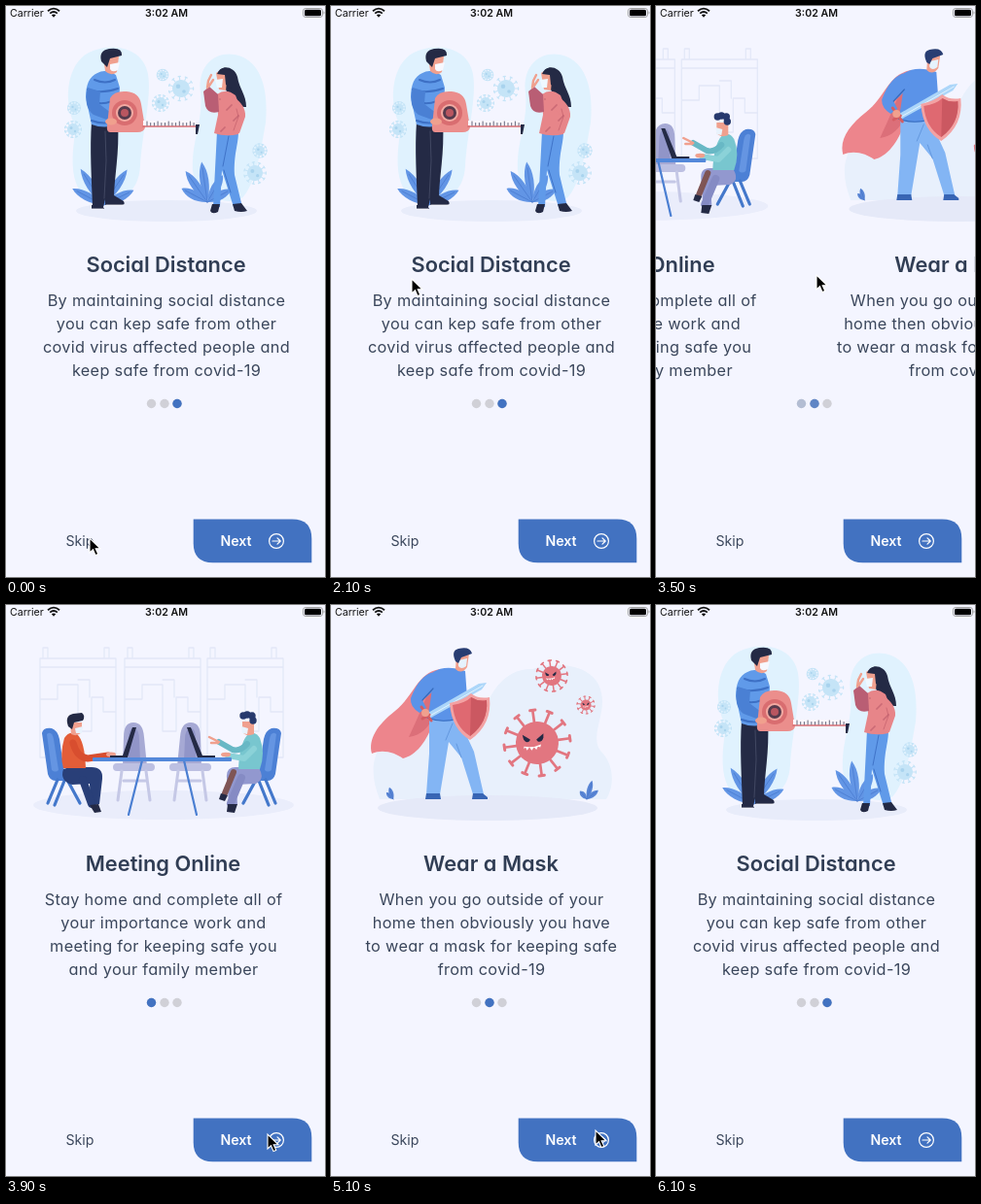
Recreate the animation shown at these times as an HTML page. Size 328 by 588 pixels, loop 6900 ms.

```html
<!DOCTYPE html>
<html lang="en">
<head>
<meta charset="utf-8">
<title>Onboarding</title>
<style>
html, body { margin: 0; width: 100%; height: 100%; overflow: hidden; background: #f4f5ff; }
svg { display: block; width: 100vw; height: 100vh; }
text { font-family: Inter, "Open Sans", sans-serif; fill: #3a465b; }
.title { font-size: 21.8px; font-weight: 600; fill: #303d54; text-anchor: middle; font-feature-settings: "cv11"; }
.body { font-size: 16.3px; letter-spacing: .32px; text-anchor: middle; font-feature-settings: "cv11"; }
.label { font-size: 14.2px; text-anchor: middle; }
.bar { font-size: 10.6px; fill: #111; }
</style>
</head>
<body>
<svg id="stage" viewBox="0 0 328 588"></svg>
<script>
const LOOP = 6900, STEP = 100, PITCH = 334;
const BLUE = '#4272c1', NAVY = '#242a45', SKIN = '#f0a08e';

// Markup helpers
const path = (d, fill) => `<path d="${d}" fill="${fill}"/>`;
const line = (d, stroke, w = 1) =>
  `<path d="${d}" fill="none" stroke="${stroke}" stroke-width="${w}" stroke-linecap="round" stroke-linejoin="round"/>`;
const oval = (x, y, rx, ry, fill) => `<ellipse cx="${x}" cy="${y}" rx="${rx}" ry="${ry}" fill="${fill}"/>`;
const disc = (x, y, r, fill) => oval(x, y, r, r, fill);
const rect = (x, y, w, h, r, fill) => `<rect x="${x}" y="${y}" width="${w}" height="${h}" rx="${r}" fill="${fill}"/>`;
const group = (transform, inner) => `<g transform="${transform}">${inner}</g>`;
const range = (n, f) => Array.from({ length: n }, (_, i) => f(i)).join('');

const leaf = (x, y, angle, len, w, fill) => group(`translate(${x} ${y}) rotate(${angle})`,
  path(`M0 0C${-w} ${-len * .35} ${-w} ${-len * .75} 0 ${-len}C${w} ${-len * .75} ${w} ${-len * .35} 0 0Z`, fill) +
  line(`M0 0V${-len * .85}`, '#3f70c6', .5));

const virus = (x, y, r, reach, n, fill, w) => group(`translate(${x} ${y}) rotate(-8)`,
  range(n, i => group(`rotate(${i * 360 / n})`,
    line(`M0 ${-r}V${-reach}`, fill, w) + line(`M${-w} ${-reach}H${w}`, fill, w * 1.1))) + disc(0, 0, r, fill));

const angryFace = (x, y, s) => group(`translate(${x} ${y}) scale(${s})`,
  path('M-14 -9L-4 -3C-5 2 -12 1 -13 -5Z', NAVY) + path('M13 -11L4 -3C6 2 12 0 13 -6Z', NAVY) +
  path('M-12 6Q0 8 10 3L9 7L6 6L4 10L1 7L-2 11L-5 7L-8 11L-10 7L-12 9Z', '#fff'));

const copy = (title, lines) => `<text class="title" x="164.5" y="274">${title}</text>` +
  lines.map((s, i) => `<text class="body" x="165" y="${309 + i * 24}">${s}</text>`).join('');

// Page art
function meeting() {
  const pale = '#e3e8f8';
  const panel = x => line(`M${x} 64H${x + 78}V157H${x}ZM${x} 55H${x + 78}V64H${x}ZM${x + 3} 55V44H${x + 8}V55M${x + 66} 55V44H${x + 71}V55` +
    `M${x} 97H${x + 18}V82H${x + 39}V130H${x + 53}V95H${x + 65}V110H${x + 78}M${x + 39} 77H${x + 51}V95`, pale, 1.3);
  const chair = path('M37 132Q38 126 47 127Q53 129 55 138L60 172Q62 179 73 178V181H51Q45 181 43 174Z', '#4c80d5') +
    path('M42 133Q47 129 49 138L54 170Q51 173 47 170Z', '#6595e2') +
    line('M53 180L43 204M63 180L76 204M60 181L50 206', '#4478cb', 3.2);
  const stool = path('M121 136Q121 121 131 121Q141 121 142 136L145 166H120Z', '#a6a9d4') +
    path('M126 138Q126 127 131 127Q137 127 137 139L138 160H126Z', '#9195c8') +
    rect(110, 163, 43, 8, 4, '#bdc0e2') + line('M119 171L115 201M144 171L148 201M121 181H143', '#c5c8e6', 3);
  const left = chair +
    path('M66 167H88Q100 167 99 179L96 205L87 207L86 184L68 185Q55 181 59 169Z', '#293f78') +
    line('M79 180L88 205', '#293f78', 8) +
    path('M86 206L95 205L98 213L91 214Z', NAVY) +
    path('M60 137Q65 129 73 133Q81 140 82 168H59Q55 154 60 137Z', '#e35d38') +
    line('M69 142Q73 157 84 158L105 155', '#d84e2f', 7) + oval(108, 154, 5, 2.4, SKIN) +
    path('M66 121H78L78 131Q73 136 67 133Z', SKIN) + path('M71 127L79 125L78 132L72 132Z', '#e9f3fd') +
    path('M64 125Q60 114 69 112L78 111Q82 114 79 119L70 121L68 128Z', NAVY);
  const right = group('translate(320 0) scale(-1 1)', chair) +
    path('M258 167H236Q226 167 227 178L229 204L238 206L237 185L257 184Q267 179 260 168Z', '#9298cf') +
    line('M242 178L231 204', '#858bc4', 8) + line('M234 172L225 194', '#7f5555', 6) +
    path('M228 205L238 205L235 214L227 213Z', NAVY) + path('M221 194L228 196L225 202L219 200Z', NAVY) +
    path('M261 137Q256 129 249 133Q240 142 239 169H261Q267 152 261 137Z', '#78c6cf') +
    line('M248 143Q241 151 233 149L219 141', '#68b8c5', 6) + line('M219 141L209 136M218 142L211 142', SKIN, 2.5) +
    line('M255 148L245 158L228 155', '#8bd2d8', 6) + oval(226, 154, 5, 2.3, SKIN) +
    path('M243 120H255L255 133Q247 136 243 131Z', SKIN) + path('M242 125L249 127L248 133L243 132Z', '#e9f3fd') +
    [[244, 114], [248, 113], [253, 114], [254, 119]].map(([x, y]) => disc(x, y, 3.7, '#27396d')).join('');
  return [35, 122, 207].map(panel).join('') + oval(162, 206, 134, 15, '#eaedfb') +
    stool + group('translate(321 0) scale(-1 1)', stool) + left + right +
    line('M140 160L126 216M183 160L196 216', '#4b7fd2', 2.2) + rect(89, 157, 143, 4, 1, '#5388da') +
    path('M130 126H134L125 157H107V155H120Z', NAVY) + path('M186 126H190L202 155H215V157H197Z', NAVY);
}

function mask() {
  const red = '#e27680';
  return path('M50 200C38 170 40 140 82 119L155 119C161 92 178 65 207 66C232 57 273 61 278 91C283 112 266 135 277 150C291 163 292 186 283 200Z', '#e8f0fc') +
    oval(161, 209, 113, 13, '#e5e9f8') +
    path('M112 66C88 70 86 93 66 109C48 123 38 138 42 153C53 148 66 152 74 158C87 155 99 141 106 118Z', '#ed858c') +
    path('M104 76C98 98 88 118 80 136C93 134 101 126 106 113Z', '#dc6f79') +
    [[-45, 10], [-18, 13]].map(([a, l]) => leaf(64, 200, a, l, 3, '#5a86d5')).join('') +
    [[-40, 11], [16, 20], [52, 15]].map(([a, l]) => leaf(263, 200, a, l, 3.5, '#5a86d5')).join('') +
    path('M101 114H130L147 151L157 195H146L134 157L121 141L112 195H98L101 153Z', '#83b5f4') +
    line('M118 139L125 122M134 157L129 143', '#6398df', 1) +
    path('M98 194H112L113 200H97ZM146 194H156L161 198V200H145Z', '#3865b4') +
    path('M105 69Q118 61 138 68L140 96Q128 104 131 118Q115 122 99 116Q104 94 105 69Z', '#5b93e8') +
    path('M106 69Q91 72 82 96Q81 105 91 111L98 106L94 98Q107 89 111 78Z', '#5b93e8') +
    line('M94 98L105 86M99 116Q114 122 130 117', '#356abc', 1.2) +
    path('M98 112L152 81L160 80L155 87L101 117Z', '#acd6f9') + line('M100 115L156 83', '#e1f3ff', 1) +
    line('M93 105L103 119M94 117L101 113', '#d55d62', 3) + disc(97, 111, 4, SKIN) +
    path('M129 50H142L140 64Q134 72 128 66Z', SKIN) + path('M131 57L140 55L139 63Q134 67 131 63Z', '#e6f3fe') +
    path('M128 58Q123 47 131 45Q143 42 145 50L134 54L131 60Z', '#283d72') +
    path('M122 101Q136 98 144 91Q151 97 163 95Q166 123 143 139Q124 128 122 101Z', '#f3a2a3') +
    path('M125 103Q138 101 144 95Q152 100 160 98Q162 121 143 135Q127 125 125 103Z', '#df6971') +
    path('M144 95Q152 100 160 98Q162 121 143 135Z', '#cb5861') +
    virus(212, 142, 22, 34, 12, red, 2.7) + angryFace(208, 141, .8) +
    virus(227, 73, 10, 16, 12, red, 1.5) + angryFace(226, 73, .42) +
    virus(262, 103, 5.5, 9, 10, red, 1) + angryFace(262, 103, .25);
}

function distance() {
  const pale = '#c5e4f7', shirt = '#609ae9', pink = '#e78589';
  const germs = [[180, 85, 9], [159, 100, 6], [161, 71, 4], [70, 105, 4.5], [69, 127, 6], [261, 149, 5], [256, 172, 8]];
  return path('M72 125C58 100 62 60 85 48C105 38 140 40 146 70C150 95 140 130 138 165C136 198 110 205 88 200C66 190 66 160 72 125Z', '#e0f2fe') +
    path('M200 90C196 62 215 46 235 50C262 55 270 85 267 120C262 150 255 190 240 200C215 205 195 190 192 170C190 140 203 120 200 90Z', '#e0f2fe') +
    oval(165, 211, 93, 11, '#e8ecfa') +
    germs.map(([x, y, r]) => virus(x, y, r, r * 1.4, 11, pale, 1.1) + disc(x - r / 3, y - r / 4, r / 4, '#a9d3ee') + disc(x + r / 3, y + r / 3, r / 5, '#a9d3ee')).join('') +
    [[-62, 36], [-32, 44], [8, 46], [34, 44], [64, 35]].map(([a, l]) => leaf(100, 205, a, l, 6, '#6295e5')).join('') +
    [[-62, 30], [-35, 39], [-8, 42], [30, 32], [62, 28]].map(([a, l]) => leaf(207, 202, a, l, 6, '#6295e5')).join('') +
    // man with the tape
    path('M88 119H115C117 151 111 178 111 198L102 199L100 207H89C88 176 86 148 88 119Z', NAVY) +
    line('M102 129L103 159L101 198', '#49506a', .8) +
    path('M102 198L111 195L121 201Q123 205 119 205H102ZM88 205H99L101 209H88Z', NAVY) +
    line('M103 205H121M88 209H100', '#fff', .8) +
    path('M94 69Q102 64 113 71L117 84L115 122Q101 127 88 122L82 94Q82 74 94 69Z', shirt) +
    line('M91 76Q102 81 112 76M84 86Q98 91 115 85M85 97Q96 103 109 98M88 108Q97 113 107 110M88 118Q101 123 114 118', '#3d70c5', 2) +
    path('M84 84Q79 104 90 112L109 119L112 113L96 101L97 88Z', '#4a80d4') +
    path('M100 52H116L114 68Q108 73 102 67Z', SKIN) + path('M107 60L117 58L115 66Q109 69 107 65Z', '#f7f8fe') +
    path('M98 57Q95 46 106 44Q120 42 119 51L107 54L104 63Z', NAVY) +
    path('M107 95Q111 87 124 88Q137 89 139 101L143 125Q142 130 135 130H107Q103 130 104 123Z', '#eb8e8c') +
    disc(122, 110, 13, '#d96d70') + disc(122, 110, 9, '#f2aaa2') + disc(122, 110, 7, '#563b4d') + disc(122, 110, 4, '#b95660') +
    oval(108, 119, 6, 3.5, SKIN) +
    rect(141, 118, 54, 5, 0, '#fbf7fc') + line('M141 124H196', '#d96f73', 1.7) +
    range(14, i => line(`M${145 + i * 3.7} 123v${i % 3 ? -2.5 : -4}`, NAVY, .7)) + path('M195 122H199L197 132H195Z', NAVY) +
    // woman
    path('M219 70C219 60 235 61 238 73C240 86 247 91 247 104C238 105 230 96 226 86Z', NAVY) +
    path('M217 129H239C239 143 234 152 235 174L243 207H234L222 169L220 207H213Z', shirt) +
    line('M223 165L229 134M224 169L231 192', '#3f73c8', 1) +
    path('M212 204H220L218 212Q212 215 210 211ZM233 204L242 203L248 211Q242 213 235 211Z', NAVY) +
    path('M217 91Q226 84 236 92L241 105Q242 118 239 132Q226 135 214 131L218 112Z', pink) +
    path('M218 91L209 83L203 88L205 103Q208 112 219 109Z', '#b95e74') +
    path('M233 93Q247 102 246 114L240 131L234 130L238 115L230 106Z', pink) +
    line('M237 106L239 114L234 128', '#c7646f', .8) +
    range(18, i => disc(220 + i * 7 % 20, 96 + i * 11 % 34, .65, '#b75868')) +
    path('M216 69Q221 64 228 69L226 87L219 86Z', SKIN) + path('M215 76L223 75L222 84L217 84Z', '#eff8ff') +
    line('M207 84L208 77L211 71M209 82L213 76', SKIN, 2.4) +
    path('M217 70Q221 60 232 66L232 85L226 81L225 71Z', NAVY);
}

const pages = [
  group('translate(3 0)', meeting()) + copy('Meeting Online', ['Stay home and complete all of', 'your importance work and', 'meeting for keeping safe you', 'and your family member']),
  mask() + copy('Wear a Mask', ['When you go outside of your', 'home then obviously you have', 'to wear a mask for keeping safe', 'from covid-19']),
  distance() + copy('Social Distance', ['By maintaining social distance', 'you can kep safe from other', 'covid virus affected people and', 'keep safe from covid-19'])
];

const statusBar = '<text class="bar" x="4" y="11">Carrier</text>' +
  '<text class="bar" x="165" y="11" text-anchor="middle" font-weight="600">3:02 AM</text>' +
  '<g fill="none" stroke="#111" stroke-width="1.8"><path d="M43 5.2Q49 0 55 5.2M45.2 7.6Q49 4.3 52.8 7.6"/></g>' +
  path('M46.8 9.3Q49 7.6 51.2 9.3L49 11.7Z', '#111') +
  '<rect x="305.5" y="2.5" width="20" height="9" rx="2.6" fill="none" stroke="#999" stroke-width=".9"/>' +
  rect(307, 3.7, 17, 6.6, 1.5, '#000') + path('M326.5 5.3Q328.5 7 326.5 8.7Z', '#999');

const button = path('M192.7 528.6H294.3Q314.3 528.6 314.3 548.6V573.3H212.7Q192.7 573.3 192.7 553.3Z', BLUE) +
  '<text class="label" x="236.5" y="556" style="fill:#fff;font-weight:600">Next</text>' +
  '<circle cx="278" cy="551" r="7.4" fill="none" stroke="#fff" stroke-width="1.2"/>' +
  line('M274 551H282M279 547.8L282.2 551L279 554.2', '#fff', 1.2);

const dotX = [149.5, 163, 176];
const stage = document.getElementById('stage');
stage.innerHTML = rect(0, 0, 328, 588, 0, '#f4f5ff') +
  pages.map(p => `<g class="page">${p}</g>`).join('') +
  dotX.map(x => disc(x, 409.5, 4.7, '#d0d0d7')).join('') +
  dotX.map(x => `<circle class="dot" cx="${x}" cy="409.5" r="4.7" fill="${BLUE}"/>`).join('') +
  '<text class="label" x="76" y="556">Skip</text>' + button + statusBar +
  '<g id="cursor"><path d="M0 0V15L3.5 11.8L6 17.6L8.7 16.4L6.2 10.8H11Z" fill="#000" stroke="#fff" stroke-width="1.1"/></g>';

const pageEls = stage.querySelectorAll('.page');
const dotEls = stage.querySelectorAll('.dot');
const cursor = document.getElementById('cursor');

// Motion
const drag = [[2400, 2], [2600, 1.93], [2800, 1.75], [2945, 1.5], [3100, 1.175], [3200, 1.05], [3300, 1],
  [3400, .85], [3500, .55], [3600, .25], [3700, .08], [3800, .025], [3900, .009], [4000, 0]];
const pointer = [[1600, 86, 548], [1800, 85, 430], [2100, 83, 281], [2400, 82, 280], [2800, 150, 278], [3000, 95, 276],
  [3100, 59, 275], [3250, 62, 275], [3500, 165, 277], [3900, 269, 545], [4400, 272, 541]];
const turns = [[-LOOP, 2], [2945, 1], [3450, 0], [4512, 1], [5420, 2]];
const taps = [4368, 5250], SLIDE = 600, FADE = 250, HIDE = 6100;

const clamp = v => Math.min(1, Math.max(0, v));

function track(keys, t) {
  const i = keys.findIndex(k => k[0] > t);
  if (i === 0) return keys[0].slice(1);
  if (i < 0) return keys[keys.length - 1].slice(1);
  const a = keys[i - 1], b = keys[i], f = (t - a[0]) / (b[0] - a[0]);
  return a.slice(1).map((v, j) => v + (b[j + 1] - v) * f);
}

// cubic-bezier(.25, .1, .25, 1)
function ease(x) {
  if (x <= 0 || x >= 1) return clamp(x);
  const curve = (u, a, b) => 3 * u * (1 - u) * ((1 - u) * a + u * b) + u ** 3;
  let lo = 0, hi = 1;
  for (let i = 0; i < 20; i++) {
    const mid = (lo + hi) / 2;
    if (curve(mid, .25, .25) < x) lo = mid; else hi = mid;
  }
  return curve(lo, .1, 1);
}

function draw(t) {
  const pos = taps.reduce((p, start) => p + ease((t - start) / SLIDE), track(drag, t)[0]);
  pageEls.forEach((el, i) => el.setAttribute('transform', `translate(${((i - pos) * PITCH).toFixed(2)} 0)`));

  const k = turns.filter(([at]) => at <= t).length - 1;
  const [at, now] = turns[k], before = k ? turns[k - 1][1] : now;
  const f = clamp((t - at) / FADE);
  dotEls.forEach((el, i) => el.setAttribute('opacity', i === now ? f : i === before ? 1 - f : 0));

  cursor.setAttribute('transform', `translate(${track(pointer, t).join(' ')})`);
  cursor.setAttribute('visibility', t < HIDE ? 'visible' : 'hidden');
}

const begin = performance.now();
function tick() {
  const t = (performance.now() - begin) % LOOP;
  draw(Math.floor(t / STEP) * STEP);
  requestAnimationFrame(tick);
}
draw(0);
requestAnimationFrame(tick);
</script>
</body>
</html>
```
